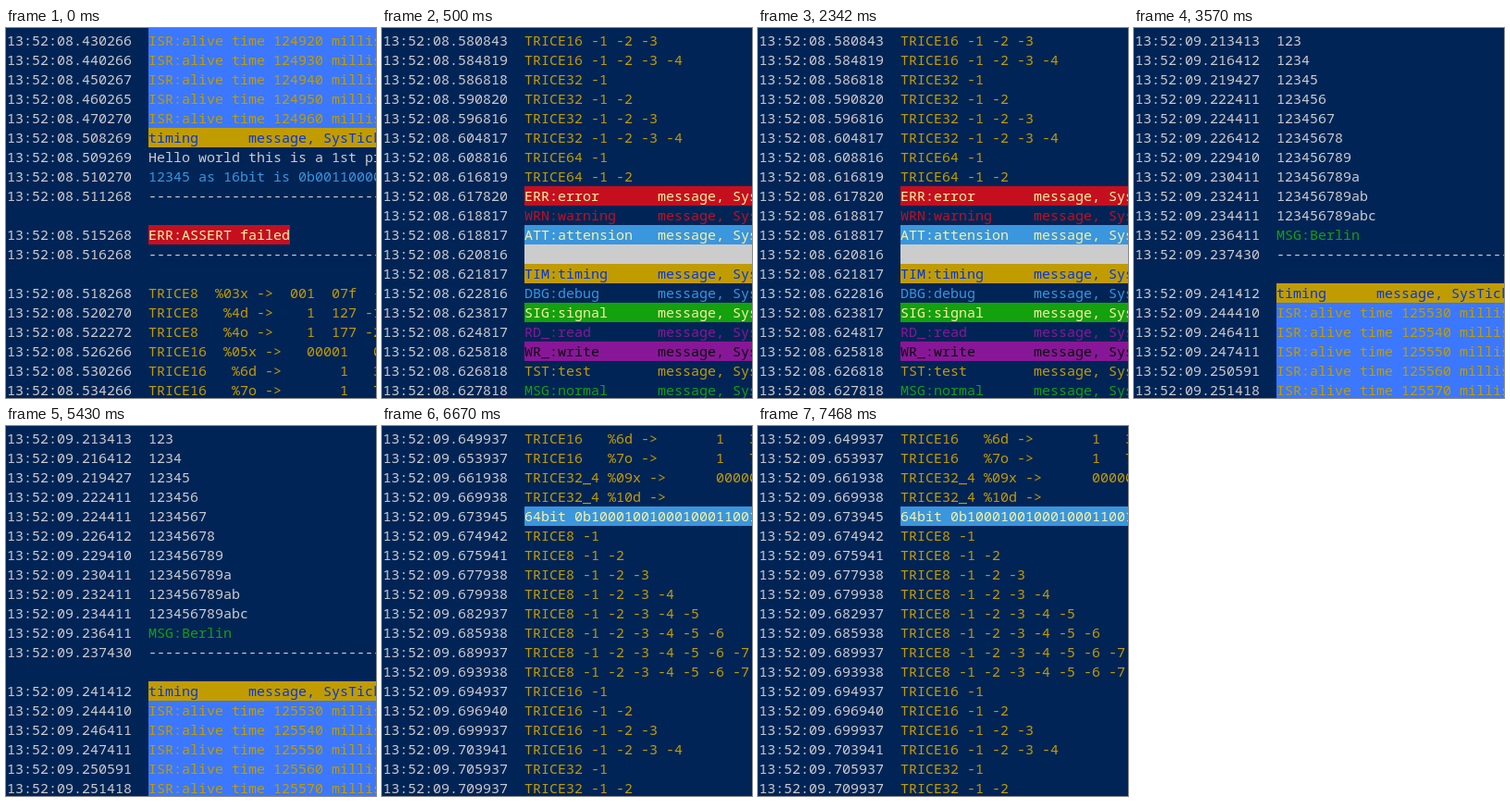
Recreate the animation shown at these times as an HTML page. Size 400 by 400 pixels, loop 8000 ms.

```html
<!DOCTYPE html>
<html lang="en">
<head>
<meta charset="utf-8">
<title>Trace log</title>
<style>
  html, body { margin: 0; width: 100%; height: 100%; overflow: hidden; background: #012456; }
  svg { display: block; width: 400px; height: 400px; }
  text { font: 15px "Noto Sans Mono", monospace; white-space: pre; }
</style>
</head>
<body>
<svg id="stage" viewBox="0 0 400 400"></svg>
<script>
const CHAR = 9, ROW = 21, TOP = 3, BASE = 19, LEFT = 1, BODY = 154, LOOP = 8000;

const C = {
  gray: '#cccccc', yellow: '#c19c00', pale: '#f9f1a5', red: '#c50f1f', blue: '#0037da',
  sky: '#3b78ff', cyan: '#3a96dd', green: '#13a10e', purple: '#881798', black: '#0c0c0c'
};

// style: [text colour, background]
const S = {
  n: [C.gray], y: [C.yellow], c: [C.cyan], r: [C.red], g: [C.green], p: [C.purple],
  isr: [C.yellow, C.sky], tim: [C.blue, C.yellow], err: [C.pale, C.red], att: [C.pale, C.cyan],
  inv: [C.gray, C.gray], sig: [C.pale, C.green], wr: [C.black, C.purple]
};

const dashes = '-'.repeat(28);
const timing = 'timing      message, SysTick';
const alive = ms => ['isr', `ISR:alive time ${ms} millis`];
const note = (style, label) => [style, label.padEnd(16) + 'message, Sys'];
const count = (type, n) =>
  ['y', type + Array.from({ length: n }, (_, i) => ` -${i + 1}`).join('')];
const digits = n => ['n', '123456789abc'.slice(0, n)];

// An empty stamp is a blank line.
const pages = [
  {
    from: 0, clock: '13:52:08.', lead: C.sky,
    stamps: '430266,440266,450267,460265,470270,508269,509269,510270,511268,,515268,516268,,518268,520270,522272,526266,530266,534266',
    lines: [
      alive(124920), alive(124930), alive(124940), alive(124950), alive(124960),
      ['tim', timing],
      ['n', 'Hello world this is a 1st pr'],
      ['c', '12345 as 16bit is 0b00110000'],
      ['n', dashes],
      ['err', 'ERR:ASSERT failed'],
      ['n', dashes],
      ['y', 'TRICE8  %03x ->  001  07f  -'],
      ['y', 'TRICE8   %4d ->    1  127 -1'],
      ['y', 'TRICE8   %4o ->    1  177 -2'],
      ['y', 'TRICE16  %05x ->   00001   0'],
      ['y', 'TRICE16   %6d ->       1   3'],
      ['y', 'TRICE16   %7o ->       1   7']
    ]
  },
  {
    from: 500, clock: '13:52:08.',
    stamps: '580843,584819,586818,590820,596816,604817,608816,616819,617820,618817,618817,620816,621817,622816,623817,624817,625818,626818,627818',
    lines: [
      count('TRICE16', 3), count('TRICE16', 4),
      count('TRICE32', 1), count('TRICE32', 2), count('TRICE32', 3), count('TRICE32', 4),
      count('TRICE64', 1), count('TRICE64', 2),
      note('err', 'ERR:error'), note('r', 'WRN:warning'), note('att', 'ATT:attension'),
      ['inv', ' '.repeat(28)],
      note('tim', 'TIM:timing'), note('c', 'DBG:debug'), note('sig', 'SIG:signal'),
      note('p', 'RD_:read'), note('wr', 'WR_:write'), note('y', 'TST:test'), note('g', 'MSG:normal')
    ]
  },
  {
    from: 3570, clock: '13:52:09.',
    stamps: '213413,216412,219427,222411,224411,226412,229410,230411,232411,234411,236411,237430,,241412,244410,246411,247411,250591,251418',
    lines: [
      ...Array.from({ length: 10 }, (_, i) => digits(i + 3)),
      ['g', 'MSG:Berlin'],
      ['n', dashes],
      ['tim', timing],
      alive(125530), alive(125540), alive(125550), alive(125560), alive(125570)
    ]
  },
  {
    from: 6670, clock: '13:52:09.',
    stamps: '649937,653937,661938,669938,673945,674942,675941,677938,679938,682937,685938,689937,693938,694937,696940,699937,703941,705937,709937',
    lines: [
      ['y', 'TRICE16   %6d ->       1   3'],
      ['y', 'TRICE16   %7o ->       1   7'],
      ['y', 'TRICE32_4 %09x ->      00000'],
      ['y', 'TRICE32_4 %10d ->'],
      ['att', '64bit 0b10001001000100011001'],
      ...Array.from({ length: 8 }, (_, i) => count('TRICE8', i + 1)),
      count('TRICE16', 1), count('TRICE16', 2), count('TRICE16', 3), count('TRICE16', 4),
      count('TRICE32', 1), count('TRICE32', 2)
    ]
  }
];

function add(parent, tag, attrs, text) {
  const el = document.createElementNS('http://www.w3.org/2000/svg', tag);
  for (const key in attrs) el.setAttribute(key, attrs[key]);
  if (text) el.textContent = text;
  parent.append(el);
  return el;
}

function drawPage(page) {
  const g = add(stage, 'g', {});
  if (page.lead) add(g, 'rect', { x: BODY, y: 0, width: 246, height: TOP, fill: page.lead });
  let next = 0;
  page.stamps.split(',').forEach((stamp, row) => {
    if (!stamp) return;
    const [style, text] = page.lines[next++];
    const [fill, back] = S[style];
    const y = BASE + row * ROW;
    if (back) {
      add(g, 'rect', { x: BODY, y: TOP + row * ROW, width: text.length * CHAR, height: ROW, fill: back });
    }
    add(g, 'text', { x: LEFT, y, fill: C.gray }, page.clock + stamp);
    add(g, 'text', { x: BODY, y, fill }, text);
  });
  return g;
}

const stage = document.getElementById('stage');
add(stage, 'rect', { width: 400, height: 400, fill: '#012456' });
const groups = pages.map(drawPage);

const start = performance.now();
function tick() {
  const t = Math.max(0, performance.now() - start) % LOOP;
  const current = pages.findLastIndex(p => t >= p.from);
  groups.forEach((g, i) => { g.style.display = i === current ? '' : 'none'; });
  requestAnimationFrame(tick);
}
tick();
</script>
</body>
</html>
```
